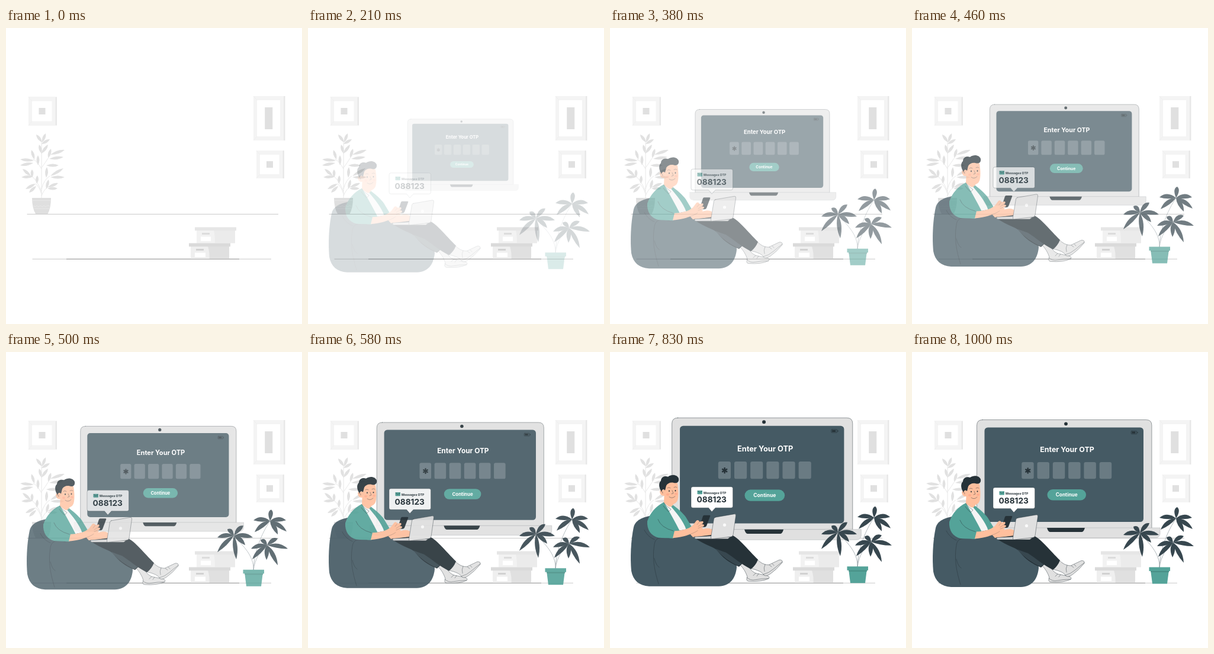
An HTML page that plays this animation: 500 px wide and 500 px high, repeating every 1.04 s.

```html
<!DOCTYPE html>
<html lang="en">
<head>
<meta charset="utf-8">
<title>Enter Your OTP</title>
<style>
  html, body { margin: 0; width: 100%; height: 100%; overflow: hidden; background: #fff; }
  svg { display: block; width: 100%; height: 100%; }
  text { font-family: Inter, "Open Sans", sans-serif; font-weight: 700; }
  .ink { stroke: #263238; stroke-width: .45; stroke-linejoin: round; stroke-linecap: round; }
  .line { fill: none; }
</style>
</head>
<body>
<svg viewBox="0 0 500 500">
  <g id="room">
    <g id="frames"></g>
    <g id="paleLeaves" fill="#e1e1e1"></g>
    <path class="line" stroke="#e3e3e3" stroke-width=".8" d="M60 288V190M60 236Q66 228 75 214M60 238Q52 224 46 222M60 272Q64 256 74 250M60 276Q52 256 42 249M60 283Q66 270 72 268M60 280Q56 268 50 263"/>
    <path fill="#dfdfdf" d="M44 287H76Q76 304 70.500 314H50Q44 304 44 287Z"/>
    <path class="line" stroke="#ededed" stroke-width=".7" d="M45 291.500H75.500M46 300l3 2 3-2 3 2 3-2 3 2 3-2 3 2 3-2 4 1M47.500 305H73"/>
    <path stroke="#bdbdbd" stroke-width=".8" d="M35.500 314.500H460M44.500 390.300H448"/>
    <path stroke="#8d8d8d" stroke-width=".8" d="M102 390.300H394"/>
    <path fill="#ebebeb" d="M322 341H387V363.500H322Z"/>
    <path fill="#f2f2f2" d="M322 342H351Q353 350 353 363.500H322Z"/>
    <path fill="#e6e6e6" d="M319 336.500H389V342.300H319Z"/>
    <path fill="#dcdcdc" d="M331 346H344V349H331ZM321 373H334V376H321Z"/>
    <path fill="#e0e0e0" d="M312 368H377V390H312Z"/>
    <path fill="#efefef" d="M312 369H341Q344 378 343.500 390H312Z"/>
    <path fill="#dadada" d="M309 363.500H379V369.300H309Z"/>
    <path fill="#d2d2d2" d="M321 373H334V376H321Z"/>
    <path fill="#fff" d="M329 352.500H346V360H329ZM319 379.500H337V387H319Z"/>
  </g>

  <g id="computer">
    <path class="ink" fill="#e0e0e0" d="M119 114.500H395.500Q405 114.500 405 124V297.500H109.500V124Q109.500 114.500 119 114.500Z"/>
    <path fill="#e0e0e0" d="M97 297H419V307Q418 314 411 314H105Q98 314 97 307Z"/>
    <path class="line" stroke="#a5abae" stroke-width=".5" d="M97 297H419V307Q418 314 411 314H105"/>
    <path fill="#263238" d="M228 297H292Q290 304 287 304H233Q230 304 228 297Z"/>
    <rect x="122.500" y="127.500" width="268.500" height="159.500" rx="5.500" fill="#455a64"/>
    <circle cx="260" cy="121.300" r="2.900" fill="#263238"/>
    <rect class="ink" x="370" y="133.300" width="10" height="5.500" rx="1.500" fill="#3d5059"/>
    <path fill="#263238" d="M371.500 134.500H377V137.500H371.500ZM380.500 135H381.500V137H380.500Z"/>
    <text x="262" y="169" font-size="12.400" text-anchor="middle" fill="#fff">Enter Your OTP</text>
    <g id="digits" fill="#fff" fill-opacity=".2"></g>
    <path stroke="#263238" stroke-width="2.300" d="M195.700 195.500V205.500M191.400 198L200 203M200 198L191.400 203"/>
    <rect x="228.500" y="232" width="65.500" height="18.500" rx="9.250" fill="#54a399"/>
    <text x="261.200" y="244" font-size="8.300" text-anchor="middle" fill="#fff">Continue</text>
  </g>

  <g id="people">
    <g id="plant">
      <path class="line" stroke="#8b979d" stroke-width=".7" d="M418 364C419 340 400 322 385 307M418 364C419 332 432 302 446 281M418 364C420 346 430 330 441 322"/>
      <g id="darkLeaves" fill="#37474f"></g>
      <path fill="#54a399" d="M403 368H434L431 391.500H406Z"/>
      <path fill="#488f86" d="M403 369H434.500L434 372H403.500Z"/>
      <path fill="#54a399" d="M400.500 363.500H436V370H400.500Z"/>
    </g>

    <path fill="#455a64" d="M73 277C55 280 43 285 40 297C35 320 34 350 36 371C39 387 49 396 66 397H184C202 396 212 385 214 365C214 349 204 336 187 324L150 308Z"/>
    <path class="ink line" d="M100 316C86 313 77 314 75 326C71 350 75 370 82 393M75 350C77 358 79 362 83 365M75 318C65 314 60 306 58 302"/>

    <path class="ink" fill="#e0e0e0" d="M220 361L230 355Q236 371 246 375L265 379Q271 381 268 384Q256 390 234 388.500Q229 388 232 381Q228 369 220 361Z"/>
    <path class="ink line" d="M231 382Q237 388 246 386T268 384M246 375L242 379M251 376L248 380"/>
    <path fill="#1f2a30" d="M152 316L207 325L229 353L218 364Q193 354 181 336Z"/>
    <path fill="#37474f" d="M176 330L205 334L226 356L217 363Q194 352 180 336Z"/>
    <path class="ink" fill="#e0e0e0" d="M248 351Q257 361 268 361L286 352.500Q292 352 291 357Q281 369 271 376Q262 382 259 377Q256 371 238 367Z"/>
    <path class="ink line" d="M259 377Q268 375 276 368T291 356M262 360Q259 366 261 372M269 361L273 364M274 359L277 362"/>
    <path fill="#263238" d="M144 316C157 309 190 307 207 311C219 317 233 335 250 352Q246 362 238 368C222 360 210 349 196 340C179 334 159 326 144 316Z"/>

    <path fill="#f5f5f5" d="M94 257L106 258L132 300L112 304L90 266Z"/>
    <path fill="#54a399" d="M104 258C113 264 124 274 128 280L140 300L129 302C124 286 111 272 103 262Z"/>
    <path fill="#ffbf9d" d="M92 234H108V257Q104 265 99 262L91 256Z"/>
    <path fill="#54a399" d="M91 255C77 262 68 273 63 287C62 301 69 312 82 315L107 316L110 304L118 304C110 288 101 272 91 255Z"/>
    <path class="ink line" d="M81 284Q86 298 107 303.500M91 256Q96 263 103 267L99 271Q94 267 90 261"/>
    <path fill="#ffbf9d" d="M91 222Q103 217 114 223C116 235 116 246 114 252Q111 259 104 258Q95 256 92 244Q85 245 84 237Q86 231 91 234Z"/>
    <path fill="#263238" d="M87 237C82 230 82 222 86 219C86 212 93 210 98 212C105 207 114 209 116 215C117 221 113 224 107 222C102 221 97 223 95 227L93 235Q89 231 87 237Z"/>
    <path class="ink line" stroke-width=".9" d="M97 231Q99 229 102 231M108 230Q111 228 113 230M105 235L107 240L104 241M100 246Q105 250 110 245M86 237Q89 236 89 240"/>
    <g fill="#263238"><ellipse cx="100" cy="236" rx=".9" ry="1.300"/><ellipse cx="110.500" cy="235.500" rx=".9" ry="1.300"/></g>
    <path fill="#ff9f84" opacity=".55" d="M95 242a2.500 2 0 1 0 5 0a2.500 2 0 1 0-5 0ZM109 241a2.500 2 0 1 0 5 0a2.500 2 0 1 0-5 0Z"/>

    <path fill="#ffbf9d" d="M130 303L155 301Q166 297 172 301L173 310L140 314Z"/>
    <path fill="#263238" d="M157 278.500Q157.500 277 159 277H168Q170 277 169 279L163 295Q162 297 160 297H153Q151 297 152 294Z"/>
    <path fill="#ffbf9d" d="M109 303.500C123 303 133 300 140 294L146 286Q150 284 151 288L157 287Q159 290 155 292L159 293Q159 297 154 297L157 299Q155 303 148 303C139 309 124 314 106 315.500Z"/>
    <path class="ink line" stroke-opacity=".5" d="M151 288L147 293M155 292L149 296M154 297L149 299M130 311Q143 307 148 303"/>
    <path class="ink" fill="#d5d5d5" d="M143 313.500L171 312L203 314L199 317H145Q142 316 143 313.500Z"/>
    <path class="ink" fill="#e0e0e0" d="M178 280.500L210 275Q213 274.500 212.500 278L208 310Q207.500 313 204 313.500L172 317Q170 317 170.500 314L175.500 283Q176 281 178 280.500Z"/>
    <circle cx="193.500" cy="293.500" r="2.600" fill="#fafafa"/>

    <path fill="#fff" stroke="#263238" stroke-width=".35" d="M140 229H204.500Q207.500 229 207.500 232V261.500Q207.500 264.500 204.500 264.500H178L172 271L166.500 264.500H140Q137 264.500 137 261.500V232Q137 229 140 229Z"/>
    <rect x="147.500" y="235.300" width="8.500" height="6.200" rx="1" fill="#54a399"/>
    <path class="ink line" d="M148 236L151.800 239L155.500 236"/>
    <text x="158" y="241" font-size="5.250" fill="#263238">Messages OTP</text>
    <text x="146.500" y="255.800" font-size="13.700" fill="#263238">088123</text>
  </g>
</svg>
<script>
const el = id => document.getElementById(id);

function rect(x, y, w, h, fill, extra = "") {
  return `<rect x="${x}" y="${y}" width="${w}" height="${h}" ${fill ? `fill="${fill}"` : ""} ${extra}/>`;
}

function wallFrame(x, y, w, h, picW, picH) {
  const midX = x + w / 2 - 1, midY = y + h / 2;
  return rect(x, y, w, h, "#e8e8e8") + rect(x, y, w - 2.5, h, "#f4f4f4") +
    rect(x + 6, y + 7, w - 14.5, h - 14, "#fff") +
    `<path stroke="#e9e9e9" stroke-width=".5" d="M${x} ${y}l6 7M${x} ${y + h}l6 -7"/>` +
    rect(midX - picW / 2, midY - picH / 2, picW, picH, "#e0e0e0");
}

// Pointed leaf from base to tip; lift arches it upwards.
function leaf([x1, y1, x2, y2], width, lift = 0) {
  const dx = x2 - x1, dy = y2 - y1, len = Math.hypot(dx, dy);
  const nx = -dy / len * width, ny = dx / len * width;
  const mx = x1 + dx * .55, my = y1 + dy * .55 - lift;
  return `<path d="M${x1} ${y1}Q${mx + nx} ${my + ny} ${x2} ${y2}Q${mx - nx} ${my - ny} ${x1} ${y1}Z"/>`;
}

const paleLeaves = [
  [61, 193, 51, 180], [61, 193, 67, 178], [60, 196, 74, 188],
  [60, 212, 56, 197], [60, 212, 71, 197], [71, 219, 76, 204],
  [75, 214, 99, 206], [73, 221, 97, 218], [48, 222, 43, 206],
  [54, 232, 54, 215], [47, 224, 24, 222], [46, 228, 24, 232],
  [68, 232, 89, 232], [68, 253, 69, 235], [75, 250, 97, 237],
  [75, 252, 99, 252], [42, 250, 28, 238], [44, 252, 44, 239],
  [46, 251, 26, 252], [52, 263, 53, 249], [50, 263, 33, 272],
  [51, 267, 39, 278], [68, 272, 72, 256], [71, 269, 88, 262], [70, 271, 87, 271]
];

const clusters = [
  { x: 385, y: 306, tips: [[401, 289], [417, 309], [404, 322], [389, 346], [357, 334], [357, 309], [374, 295]] },
  { x: 446, y: 281, tips: [[448, 262], [418, 280], [420, 300], [459, 304], [474, 299], [473, 280]] },
  { x: 441, y: 322, tips: [[430, 313], [414, 328], [416, 346], [440, 347], [459, 356], [476, 328], [459, 311]] }
];

el("frames").innerHTML = wallFrame(38, 116.5, 48, 48, 11, 11) +
  wallFrame(418, 115, 53.5, 75, 13, 37) + wallFrame(423, 207, 47, 47, 11, 11);
el("paleLeaves").innerHTML = paleLeaves.map(l => leaf(l, 5)).join("");
el("darkLeaves").innerHTML = clusters.map(({ x, y, tips }) =>
  tips.map(([tx, ty]) => leaf([x, y, tx, ty], 7.5, 4)).join("")).join("");
el("digits").innerHTML = Array.from({ length: 6 }, (_, i) =>
  rect(185.2 + i * 26.3, 186, 20.5, 28.3, "", 'rx="3"')).join("");

const LOOP = 1040, RATE = 24, LAST = 24, FIRST_VISIBLE = 3;

const bezier = (a, b, s) => 3 * a * s * (1 - s) ** 2 + 3 * b * s * s * (1 - s) + s ** 3;

function overshoot(x) {
  let lo = 0, hi = 1;
  for (let i = 0; i < 24; i++) {
    const mid = (lo + hi) / 2;
    if (bezier(.36, .5, mid) < x) lo = mid; else hi = mid;
  }
  return bezier(-.01, 1.38, hi);
}

// Motion advances in 24 steps per second, on a 10 ms grid.
function stepAt(ms) {
  let n = LAST;
  while (Math.round(n * 100 / RATE) * 10 > ms) n--;
  return n;
}

function draw(ms) {
  const n = stepAt(ms);
  const p = n < FIRST_VISIBLE ? 0 : overshoot((n + 1) / (LAST + 1));
  const opacity = Math.min(1, p);
  el("computer").setAttribute("opacity", opacity);
  el("computer").setAttribute("transform", `translate(258 214) scale(${.5 + p / 2}) translate(-258 -214)`);
  el("people").setAttribute("opacity", opacity);
  el("people").setAttribute("transform", `translate(0 ${20 * (1 - p)})`);
}

const start = performance.now();
function tick() {
  draw((performance.now() - start) % LOOP);
  requestAnimationFrame(tick);
}
tick();
</script>
</body>
</html>
```
